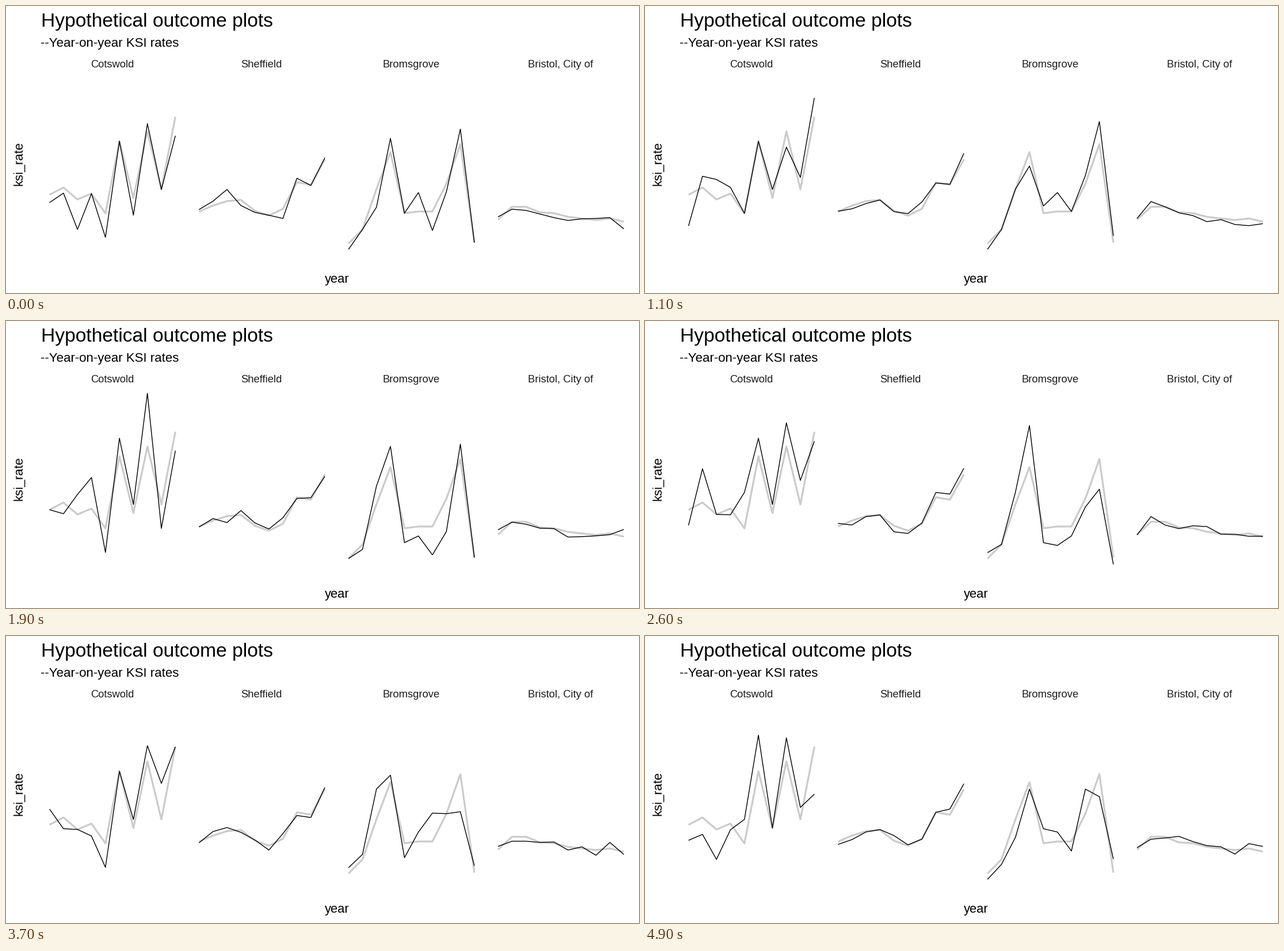
Animation of 1100x500 px, one loop 5000 ms. Source, as a matplotlib script:

```python
import numpy as np
import matplotlib.pyplot as plt
from matplotlib.animation import FuncAnimation

W, H, DPI = 1100, 500, 100
FRAMES, INTERVAL = 50, 100
HOLD = 6                 # frames the opening outcome stays
BASE = 424               # y of a zero rate
FULL = 450               # height of a rate of one
TOP = 298                # tallest outcome
PT = 72 / DPI            # points per pixel

rng = np.random.default_rng(12)
plt.rcParams["font.family"] = "Liberation Sans"

fig = plt.figure(figsize=(W / DPI, H / DPI), dpi=DPI, facecolor="white")
ax = fig.add_axes([0, 0, 1, 1])
ax.set(xlim=(0, W), ylim=(H, 0))
ax.axis("off")


def label(x, y, text, size, ha="center", color="black", **kw):
    ax.text(x, y, text, fontsize=size * PT, ha=ha, va="baseline", color=color, **kw)


def stroke(x, heights, color, width):
    return ax.plot(x, BASE - heights, color=color, lw=width * PT,
                   solid_capstyle="butt", solid_joinstyle="round")[0]


def outcomes(unit, counts, opening):
    """Heights per frame: each year's count is redrawn around its expected value."""
    trials = np.round(FULL / unit).astype(int)
    draws = rng.binomial(trials, counts * unit / FULL, (FRAMES, len(counts)))
    draws[:HOLD] = counts + opening
    return np.minimum(draws * unit, TOP)


def panel(column, name, unit, counts, opening):
    """unit: pixels per case; counts: expected cases; opening: first deviations."""
    counts, opening = np.array(counts), np.array(opening)
    unit = np.broadcast_to(unit, counts.shape)
    x = 75.6 + 259.8 * column + 24.3 * np.arange(len(counts))
    label(x.mean() - 0.5, 107, name, 18.4, color="#1a1a1a")
    stroke(x, counts * unit, "#cbcbcb", 3.2)
    series = outcomes(unit, counts, opening)
    return stroke(x, series[0], "black", 1.4), series


label(61, 36, "Hypothetical outcome plots", 33.7, ha="left")
label(60, 71, "--Year-on-year KSI rates", 22.3, ha="left")
label(575, 482, "year", 22)
label(28, 275, "ksi_rate", 22, rotation=90, rotation_mode="anchor")

PANELS = [
    panel(0, "Cotswold",
          [13.6, 9.8, 17.4, 10.8, 20.9, 15.7, 14.9, 13.7, 20.9, 16.5],
          [7, 11, 5, 9, 3, 12, 6, 15, 5, 14],
          [-1, -1, -3, 0, -2, 0, -2, 1, 0, -2]),
    panel(1, "Sheffield", 0.7,
          [94, 109, 120, 123, 96, 84, 101, 167, 161, 224],
          [5, 11, 29, -14, -4, 1, -24, 10, -2, 4]),
    panel(2, "Bromsgrove",
          [10.2, 8.7, 10.5, 12.1, 12.6, 16.5, 16.5, 14.3, 13.1, 11.8],
          [1, 4, 10, 14, 5, 4, 4, 8, 14, 1],
          [-1, 0, -3, 2, 0, 2, -2, -1, 2, 0]),
    panel(3, "Bristol, City of", 0.7,
          [74, 106, 106, 92, 90, 81, 77, 73, 77, 69],
          [7, -6, -9, -4, -11, -9, -1, 4, 2, -18]),
]


def update(frame):
    for line, series in PANELS:
        line.set_ydata(BASE - series[frame])
    return [line for line, _ in PANELS]


anim = FuncAnimation(fig, update, frames=FRAMES, interval=INTERVAL,
                     repeat=True, repeat_delay=0)
plt.show()
```
